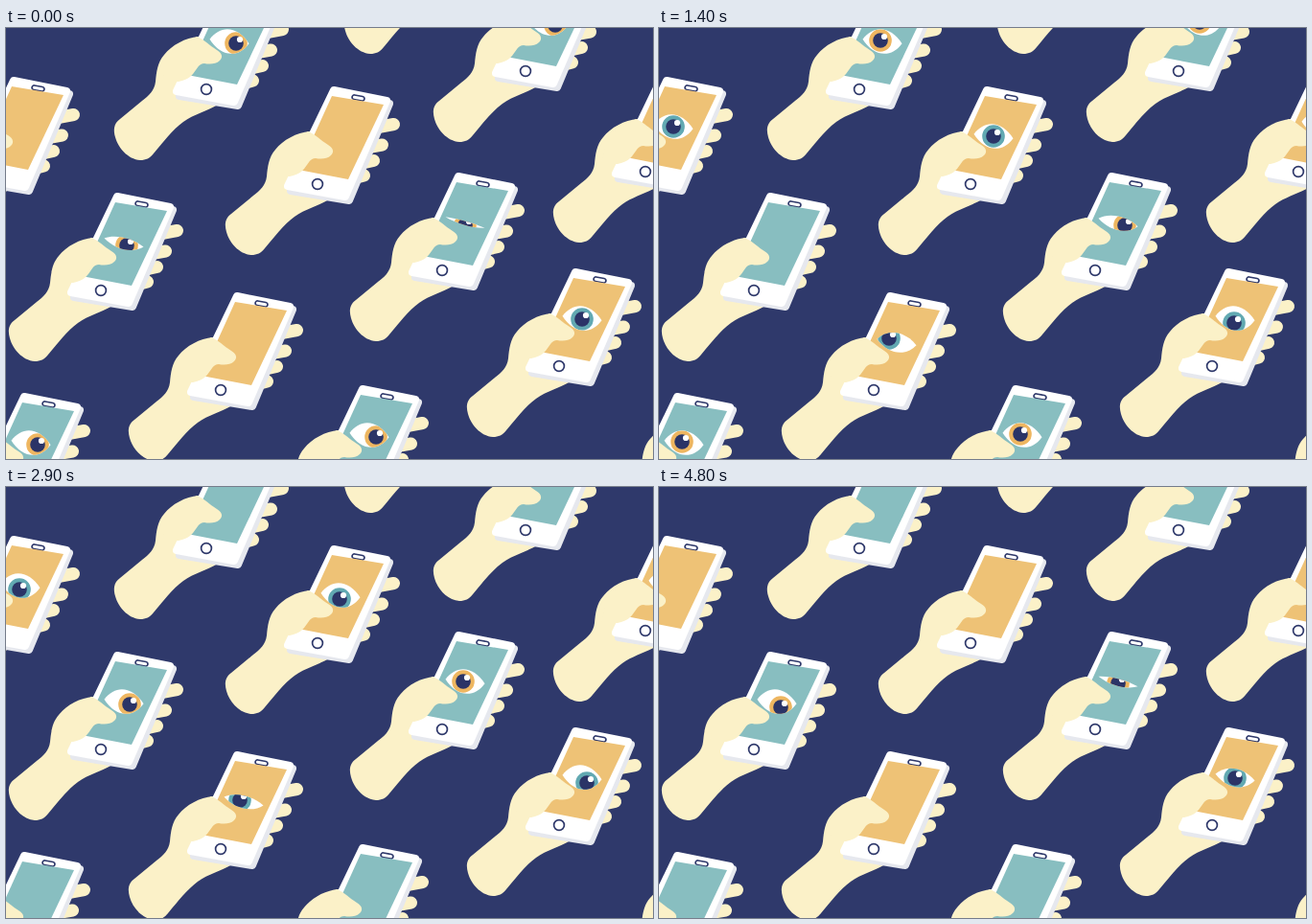
An HTML page that plays this animation: 675x450 px, repeating every 4.9 s.

```html
<!DOCTYPE html>
<html lang="en">
<head>
<meta charset="utf-8">
<title>Watching phones</title>
<style>
  html, body { margin: 0; width: 100%; height: 100%; overflow: hidden; background: #2f396b; }
  svg { display: block; width: 675px; height: 450px; }
  .skin { fill: #fbf1c8; }
  .fingers { fill: none; stroke: #fbf1c8; stroke-width: 13; stroke-linecap: round; }
  .side { fill: #e6e8ee; stroke: #e6e8ee; stroke-width: 8; stroke-linejoin: round; }
  .front { fill: #fff; stroke: #fff; stroke-width: 8; stroke-linejoin: round; }
  .line { fill: #fff; stroke: #2f396b; stroke-width: 1.7; }
  .pupil { fill: #2b3467; }
  .teal { fill: #88bec0; }
  .orange { fill: #eec276; }
</style>
</head>
<body>
<svg viewBox="0 0 675 450" xmlns="http://www.w3.org/2000/svg">
  <defs>
    <!-- The origin of every part is the home button. -->
    <g id="back">
      <path class="skin" d="M-8-55 C-22-54-36-46-44-36 C-51-28-52-18-53-8 C-54 1-60 7-67 12
        L-90 31 C-97 36-97 43-95 50 C-92 61-82 73-69 74 C-63 74-59 72-55 67
        C-45 55-35 42-24 34 C-13 26 0 23 12 16 L10-40Z"/>
      <path class="fingers" d="M50-57 L79.500-62.500 M45-37 L67.500-41 M38-20 L58.500-24.500 M30-4 L48.500-9"/>
      <path class="side" d="M18-94 L75-84 L33 17 L-28 7Z"/>
      <path class="front" d="M17-98 L72-87 L29 13 L-31 2Z"/>
      <rect class="line" x="-6.500" y="-2.300" width="13" height="4.600" rx="2.300" transform="translate(42.500 -90) rotate(10)"/>
      <circle class="line" r="5.400"/>
    </g>
    <path id="screen" d="M15-92 L69-83 L32-5 L-20-15Z"/>
    <path id="thumb" class="skin" d="M-10-55 C-2-52 3-46 11-41 C16-38 18-34 14-30
      C10-26 3-26-2-27 C-8-27-9-22-14-16 C-18-11-24-9-29-8 L-46-8 L-40-38Z"/>
  </defs>
</svg>
<script>
const svg = document.querySelector('svg');
const defs = svg.querySelector('defs');
const LOOP = 4900, STEP = 100;

// Each key: time in s, lid opening, gaze x, gaze y.
const groups = [
  { tint: 'teal', at: [[209, 64], [542, 45], [2, 483], [355, 475], [449, -47]], keys: [
    [0, 1, 7, 2], [.3, 1, 7, 2], [.5, 1, -1, 4], [1, 1, -1, 4], [1.2, 1, -2, -1], [1.8, 1, -2, -1],
    [2.1, 0, 0, 0], [3.3, 0, 0, 0], [3.6, 1, 0, 0], [4.4, 1, 0, 0], [4.6, 0, 0, 0]] },
  { tint: 'orange', at: [[-9, 153], [325, 163], [667, 150], [716, 465]], keys: [
    [0, 0, 0, 1], [.5, 0, 0, 1], [.6, .1, 0, 1], [.9, 1, 0, 0], [1.7, 1, 0, 0], [1.9, 1, 6, 1],
    [2.3, 1, 6, 1], [2.4, .5, 6, 1], [2.5, 0, 4, 2], [2.7, 1, -1, 4], [3.2, 1, -1, 4],
    [3.4, 1, 0, 0], [4.3, 1, 0, 0], [4.6, 0, 0, 0]] },
  { tint: 'teal', at: [[99, 274]], keys: [
    [0, .4, 3, 3], [.2, 0, 2, 3], [1.7, 0, -3, -1], [2, 1, -3, -2], [2.5, 1, -3, -2], [2.7, 1, 6, 3],
    [3.2, 1, 6, 3], [3.5, 1, -4, -3], [4.2, 1, -4, -3], [4.5, 1, 4, 6], [4.8, 1, 4, 6]] },
  { tint: 'teal', at: [[455, 253]], keys: [
    [0, .1, 0, 3], [.3, 1, -4, -1], [1, 1, -4, -1], [1.2, 1, 7, 3], [1.3, 1, 7, 3], [1.4, .5, 7, 3],
    [1.5, 0, 7, 3], [1.8, 1, 2, 2], [2.3, 1, 1, 2], [2.4, .4, 1, 2], [2.5, 0, 0, 2], [2.8, 1, -2, 0],
    [3.4, 1, -2, 0], [3.7, 0, 0, 2], [4.6, 0, 0, 2], [4.8, .22, 0, 2]] },
  { tint: 'orange', at: [[224, 378]], keys: [
    [0, 0, -8, -3], [1.2, 0, -8, -3], [1.4, .75, -8, -4], [1.5, 1, -8, -4], [1.8, 1, -8, -4],
    [2.1, 1, -1, 3], [2.6, 1, -1, 3], [2.8, 1, -4, -1], [2.9, .45, -4, -1], [3, 0, -4, -1],
    [3.3, 1, 5, 4], [4.2, 1, 5, 4], [4.5, 0, 4, 3]] },
  { tint: 'orange', at: [[577, 353]], keys: [
    [0, 1, 0, 1], [.3, 1, 0, 1], [.5, 1, -3, -2], [1, 1, -3, -2], [1.2, 1, -1, 5], [1.8, 1, -1, 5],
    [2.1, 1, -2, -1], [2.5, 1, -2, -1], [2.7, 1, 5, 6], [3.3, 1, 5, 6], [3.6, 0, 2, 2],
    [4.5, 0, 0, 1], [4.8, .7, 0, 1]] }
];

function use(id, cls = '') {
  return `<use href="#${id}" class="${cls}"/>`;
}

groups.forEach((g, i) => {
  const iris = g.tint === 'teal' ? '#eeb660' : '#62a9b2';
  defs.insertAdjacentHTML('beforeend', `
    <clipPath id="lid${i}"><path/></clipPath>
    <g id="eye${i}" transform="translate(24 -50)">
      <path id="white${i}" fill="#fff"/>
      <g clip-path="url(#lid${i})"><g id="ball${i}">
        <circle r="11.800" fill="${iris}"/><circle class="pupil" r="7.800"/>
        <circle cx="4" cy="-4" r="3.100" fill="#fff"/>
      </g></g>
    </g>`);
  g.lids = [defs.querySelector(`#lid${i} path`), defs.querySelector(`#white${i}`)];
  g.ball = defs.querySelector(`#ball${i}`);
  for (const [x, y] of g.at) {
    svg.insertAdjacentHTML('beforeend', `<g transform="translate(${x} ${y})">` +
      use('back') + use('screen', g.tint) + use('eye' + i) + use('thumb') + '</g>');
  }
});

function sample(keys, t) {
  const n = keys.findIndex(k => k[0] > t + 1e-6);
  if (n < 0) return keys[keys.length - 1].slice(1);
  const a = keys[n - 1], b = keys[n];
  const u = (t - a[0]) / (b[0] - a[0]);
  const e = u * u * (3 - 2 * u);
  return a.slice(1).map((v, j) => v + (b[j + 1] - v) * e);
}

// The almond tilts more as the lids close.
function lidPath(open) {
  if (open < .02) return '';
  const tilt = .3 - .19 * open;
  const up = -17 * open, down = 17 * Math.pow(open, .65);
  const p = (x, y) => `${x} ${(x * tilt + y).toFixed(2)}`;
  return `M${p(-20.5, 0)}C${p(-9, up)} ${p(9, up)} ${p(20.5, 0)}C${p(9, down)} ${p(-9, down)} ${p(-20.5, 0)}Z`;
}

function draw(now) {
  const t = Math.floor((now % LOOP) / STEP) * STEP / 1000;
  for (const g of groups) {
    const [open, x, y] = sample(g.keys, t);
    const d = lidPath(open);
    g.lids.forEach(l => l.setAttribute('d', d));
    g.ball.setAttribute('transform', `translate(${x} ${y})`);
  }
}

const start = performance.now();
function tick() {
  draw(performance.now() - start);
  requestAnimationFrame(tick);
}
tick();
</script>
</body>
</html>
```
